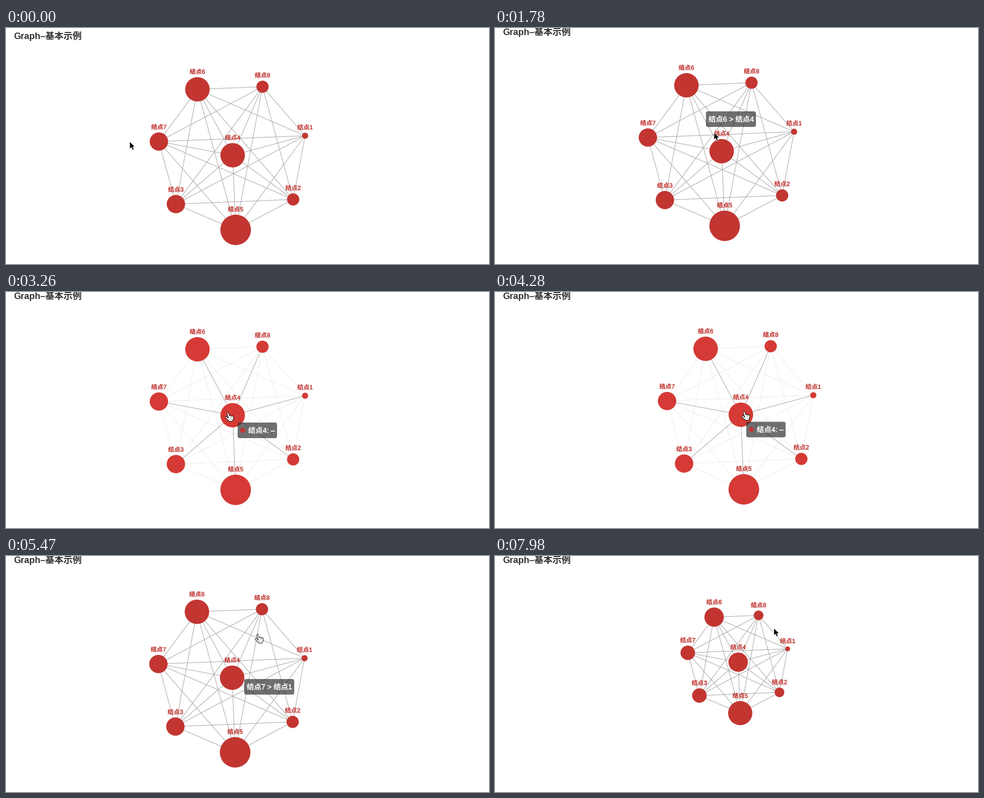
A matplotlib script that plays this animation: 957x470 px, repeating every 8000 ms.

```python
from itertools import combinations

import matplotlib.pyplot as plt
import numpy as np
from matplotlib.animation import FuncAnimation
from matplotlib.collections import LineCollection
from matplotlib.patches import Circle, FancyBboxPatch, Polygon
from matplotlib.patheffects import withStroke

W, H, DPI = 957, 470, 64
PT = 72 / DPI                       # points per pixel
LOOP, STEP, TICK = 8000, 40, 147.7  # ms; the screen refreshes once per tick
FONTS = ["Liberation Sans", "Noto Sans CJK JP"]
RED, RED_LIT, GREY = "#c23531", "#d53a36", (2 / 3, 2 / 3, 2 / 3)

# Node 4 sits in the middle, the others on a regular heptagon.
COUNT, HUB = 8, 4
RING = [1, 2, 5, 3, 7, 6, 8]
CENTER, RING_R, RING_START = np.array([449.1, 245.4]), 148.7, -15.14
LINKS = list(combinations(range(COUNT), 2))
RADII = [6.06 * (5 - abs(5 - i)) for i in range(1, COUNT + 1)]

ZOOM_AT = np.array([554.5, 144.7])
WHEEL = [50, 51, 54, 54]            # ticks at which the wheel turns one notch
LAG = 2                             # ticks the tooltip trails the pointer

# key points: tick, x, y
SCROLL = [(0, 0, 8), (3, 0, 0)]
DRAG = [(24, 0, 0), (29, 38, -1), (30, 58, -1), (33, -132, -2), (35, -1, -3)]
POINTER = [
    (0, 245, 226), (4, 251, 224), (7, 305, 221), (10, 398, 146), (12, 434, 208),
    (14, 449, 238), (17, 497, 232), (20, 439, 240), (22, 439, 240), (24, 455, 239),
    (33, 455, 239), (35, 453, 228), (37, 499, 159), (40, 514, 110), (44, 514, 110),
    (48, 553.5, 146.5),
]
# first tick, node or link under the pointer
HOVER = [(0, ()), (6, (7,)), (9, (6, 4)), (14, (4,)), (17, (4, 1)), (19, (4,)),
         (37, (7, 1)), (39, (8,)), (46, ())]

ARROW = np.array([(0, 0), (0, 15), (3.4, 11.9), (5.8, 17.2), (8.5, 16),
                  (6.2, 10.9), (10.8, 10.9)])
# index finger, thumb, palm, then three knuckles
HAND = [np.array(line) for line in (
    [(0.4, 1.4), (3.4, 11)],
    [(-2.6, 9.6), (2, 14)],
    [(3, 12), (9.6, 12.4), (8.8, 15.8), (3.2, 15.8), (6, 13.8)],
    *([(4.6 + 2.8 * j, 7 + 0.7 * j), (5.2 + 2.4 * j, 12)] for j in range(3)),
)]


def pose(keys, tick):
    t, x, y = np.transpose(keys)
    return np.array([np.interp(tick, t, x), np.interp(tick, t, y)])


def pointer_at(tick):
    return pose(POINTER, tick) + pose(DRAG, tick)


def layout():
    pts = np.tile(CENTER, (COUNT, 1))
    for k, i in enumerate(RING):
        a = np.radians(RING_START + 360 * k / len(RING))
        pts[i - 1] += RING_R * np.array([np.cos(a), np.sin(a)])
    return pts


NODES = layout()

fig = plt.figure(figsize=(W / DPI, H / DPI), dpi=DPI, facecolor="white")
ax = fig.add_axes([0, 0, 1, 1])
ax.set(xlim=(0, W), ylim=(H, 0))
ax.axis("off")


def label(text, px, color, z, **kw):
    return ax.text(0, 0, text, fontsize=px * PT, color=color, family=FONTS,
                   va="baseline", zorder=z, **kw)


def medium(color):
    return [withStroke(linewidth=0.35 * PT, foreground=color)]


def strokes(color, px, z):
    return ax.add_collection(LineCollection(
        [], colors=color, linewidths=px * PT, capstyle="round", joinstyle="round", zorder=z))


title = label("Graph–基本示例", 18, "#333333", 5, weight="bold")
edges = ax.add_collection(LineCollection([], linewidths=1.1 * PT, zorder=1))
dots = [ax.add_patch(Circle((0, 0), r, lw=0, zorder=2)) for r in RADII]
names = [label(f"结点{i}", 12, RED, 3, ha="center", path_effects=medium(RED))
         for i in range(1, COUNT + 1)]

tip_box = ax.add_patch(FancyBboxPatch(
    (0, 0), 1, 1, boxstyle="round,pad=0,rounding_size=4", fc="#323232b3", lw=0, zorder=6))
tip_dot = ax.add_patch(Circle((0, 0), 5, fc=RED, lw=0, zorder=7))
tip_text = label("", 14.4, "white", 7, path_effects=medium("white"))

arrow = ax.add_patch(Polygon(ARROW, fc="black", ec="white", lw=0.9 * PT, zorder=9))
hand = [strokes("black", 4.2, 9), strokes("white", 2.3, 10)]


def draw_graph(tick, focus):
    s = 1.1 ** -sum(tick >= t for t in WHEEL)
    pts = NODES + pose(DRAG, tick) + pose(SCROLL, tick)
    pts = ZOOM_AT + (pts - ZOOM_AT) * s
    for dot, name, (x, y), r in zip(dots, names, pts, RADII):
        r *= 1 + (s - 1) * 0.66
        dot.set(center=(x, y), radius=r, facecolor=RED_LIT if focus else RED)
        name.set_position((x, y - r - 6.7))
    edges.set_segments([pts[[a, b]] for a, b in LINKS])
    edges.set_color([(*GREY, 1.0 if not focus or focus - 1 in link else 0.2)
                     for link in LINKS])


def draw_tip(tick, item):
    node = len(item) == 1
    tip_box.set_visible(bool(item))
    tip_text.set_visible(bool(item))
    tip_dot.set_visible(node)
    if not item:
        return
    x, y = pointer_at(tick - LAG) + 20
    tip_box.set_bounds(x, y, 78 if node else 99, 31)
    tip_dot.center = (x + 10, y + 15.5)
    tip_text.set_text(f"结点{item[0]}: –" if node else " > ".join(f"结点{i}" for i in item))
    tip_text.set_position((x + (21 if node else 5), y + 20.5))


def draw_pointer(tick, item):
    at = pointer_at(tick)
    pointing = bool(item) and item != (6, 4)
    arrow.set_visible(not pointing)
    arrow.set_xy(ARROW + at)
    for part in hand:
        part.set_visible(pointing)
        part.set_segments([line + at for line in HAND])


def update(i):
    tick = int((i * STEP + 30) / TICK)
    item = [it for start, it in HOVER if start <= tick][-1]
    title.set_position(pose(SCROLL, tick) + (15, 14.4))
    draw_graph(tick, item[0] if len(item) == 1 else 0)
    draw_tip(tick, item)
    draw_pointer(tick, item)
    return []


anim = FuncAnimation(fig, update, frames=LOOP // STEP, interval=STEP,
                     repeat=True, repeat_delay=0, blit=False)
plt.show()
```
